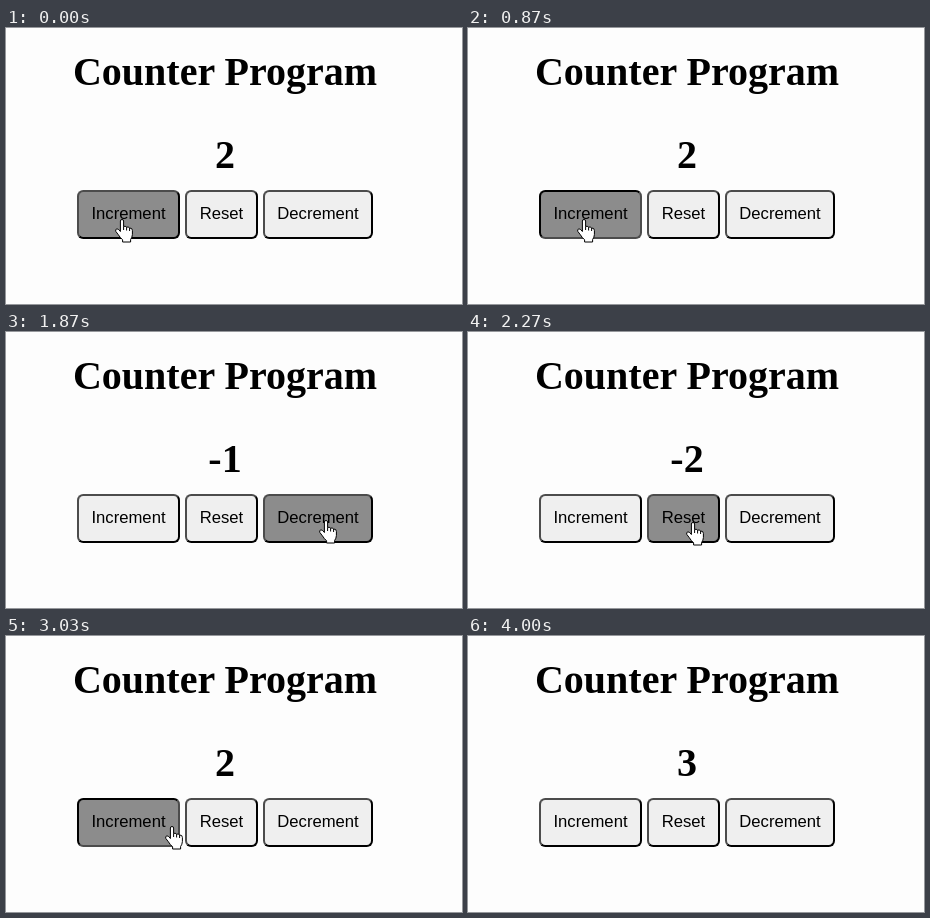
An HTML page that plays this animation: 456 px wide and 276 px high, repeating every 4.03 s.

```html
<!DOCTYPE html>
<html lang="en">
<head>
<meta charset="utf-8">
<title>Counter Program</title>
<style>
  html, body { margin: 0; width: 100%; height: 100%; overflow: hidden; background: #fdfdfd; }
  #stage { position: relative; width: 456px; height: 276px; overflow: hidden; color: #000; }
  .line {
    position: absolute; left: 0; width: 438px; margin: 0; text-align: center;
    font: bold 40px/46px "Liberation Serif", "Times New Roman", serif; white-space: nowrap;
  }
  #title { top: 21px; }
  #count { top: 104px; }
  .btn {
    position: absolute; top: 162px; height: 49px; box-sizing: border-box;
    border: 2px solid; border-color: #4c4c4c #000 #000 #4c4c4c; border-radius: 6.25px;
    background: #efefef; text-align: center; white-space: nowrap;
    font: 16.667px/43px "Liberation Sans", Arial, sans-serif;
  }
  .btn.hover { background: #8c8c8c; }
  .btn.down { border-color: #000 #4c4c4c #4c4c4c #000; }
  #cursor { position: absolute; left: 0; top: 0; overflow: visible; }
  #cursor path { fill: #fff; stroke: #000; stroke-linejoin: round; }
</style>
</head>
<body>
<div id="stage">
  <h1 id="title" class="line">Counter Program</h1>
  <div id="count" class="line">2</div>
  <svg id="cursor" width="20" height="26">
    <g id="hand">
      <path d="M-.6 12.5V2Q-.6 .5 1 .5T2.6 2V7.5Q4.2 6.6 5.6 8.2Q7.3 7.4 8.6 9Q11.4 8.8 11.4 11.5V15.5Q11.2 18.5 9.6 20.5V23H1.6V20.8Q-1 18.6 -2.6 15.8L-5.2 12.4Q-6 10.2 -4 9.8Q-2.4 10 -.6 12.5Z"/>
      <path d="M2.6 7.5V11M5.6 8.2V11.5M8.6 9V12"/>
    </g>
    <path id="arrow" d="M.5 .5V17L4.3 13.5L6.7 19.2L9.3 18.1L6.9 12.5H12Z"/>
  </svg>
</div>
<script>
const LOOP = 4030, FPS = 30, START = 2;
const CLICK_GAP = 180, HOLD = 80, PAUSE = 40, DIP = 8;
const $ = id => document.getElementById(id);

const buttons = [
  { label: "Increment", w: 103, act: n => n + 1 },
  { label: "Reset", w: 73, act: () => 0 },
  { label: "Decrement", w: 110, act: n => n - 1 },
];
const [inc, reset, dec] = buttons;

// where the pointer rests, and how often it clicks before moving on
const stops = [
  { from: 0, to: 1120, x: 115, y: 191, btn: inc, clicks: 2 },
  { from: 1350, to: 1570, x: 251, y: 197, btn: reset, clicks: 1 },
  { from: 1720, to: 2020, x: 319, y: 188, btn: dec, clicks: 2 },
  { from: 2210, to: 2410, x: 224, y: 190, btn: reset, clicks: 1 },
  { from: 2530, to: 3100, x: 165, y: 190, btn: inc, clicks: 3 },
  { from: 3560, to: LOOP, x: 190, y: -32, clicks: 0 },
];

let left = 71;
for (const b of buttons) {
  b.x = left;
  left += b.w + 5;
  b.el = document.createElement("div");
  b.el.className = "btn";
  b.el.textContent = b.label;
  b.el.style.left = b.x + "px";
  b.el.style.width = b.w + "px";
  $("stage").insertBefore(b.el, $("cursor"));
}

const ease = p => p * p * (3 - 2 * p);

function tipAt(t) {
  const i = stops.findIndex(s => t < s.to);
  const b = stops[i], a = stops[i - 1];
  if (t >= b.from) return [b.x, b.y];
  const p = ease((t - a.to) / (b.from - a.to));
  return [a.x + (b.x - a.x) * p, a.y + (b.y - a.y) * p + DIP * Math.sin(Math.PI * p)];
}

function counterAt(t) {
  let value = START, pressed = false;
  for (const s of stops) {
    for (let left = s.clicks - 1; left >= 0; left--) {
      const release = s.to - PAUSE - left * CLICK_GAP;
      if (t >= release) value = s.btn.act(value);
      else if (t >= release - HOLD) pressed = true;
    }
  }
  return { value, pressed };
}

function draw(t) {
  const [x, y] = tipAt(t).map(Math.round);
  const { value, pressed } = counterAt(t);
  let over = false;
  for (const b of buttons) {
    const hover = x >= b.x && x < b.x + b.w && y >= 162 && y < 211;
    over = over || hover;
    b.el.classList.toggle("hover", hover);
    b.el.classList.toggle("down", hover && pressed);
  }
  $("count").textContent = value;
  $("hand").style.display = over ? "" : "none";
  $("arrow").style.display = over ? "none" : "";
  $("cursor").style.transform = `translate(${x}px, ${y}px)`;
}

function tick() {
  const t = performance.now() % LOOP;
  // hold each picture for one frame; 7 ms absorbs the 30/30/40 rounding
  draw(Math.min(LOOP - 1, Math.floor((t + 7) * FPS / 1000) * 1000 / FPS));
  requestAnimationFrame(tick);
}
tick();
</script>
</body>
</html>
```
